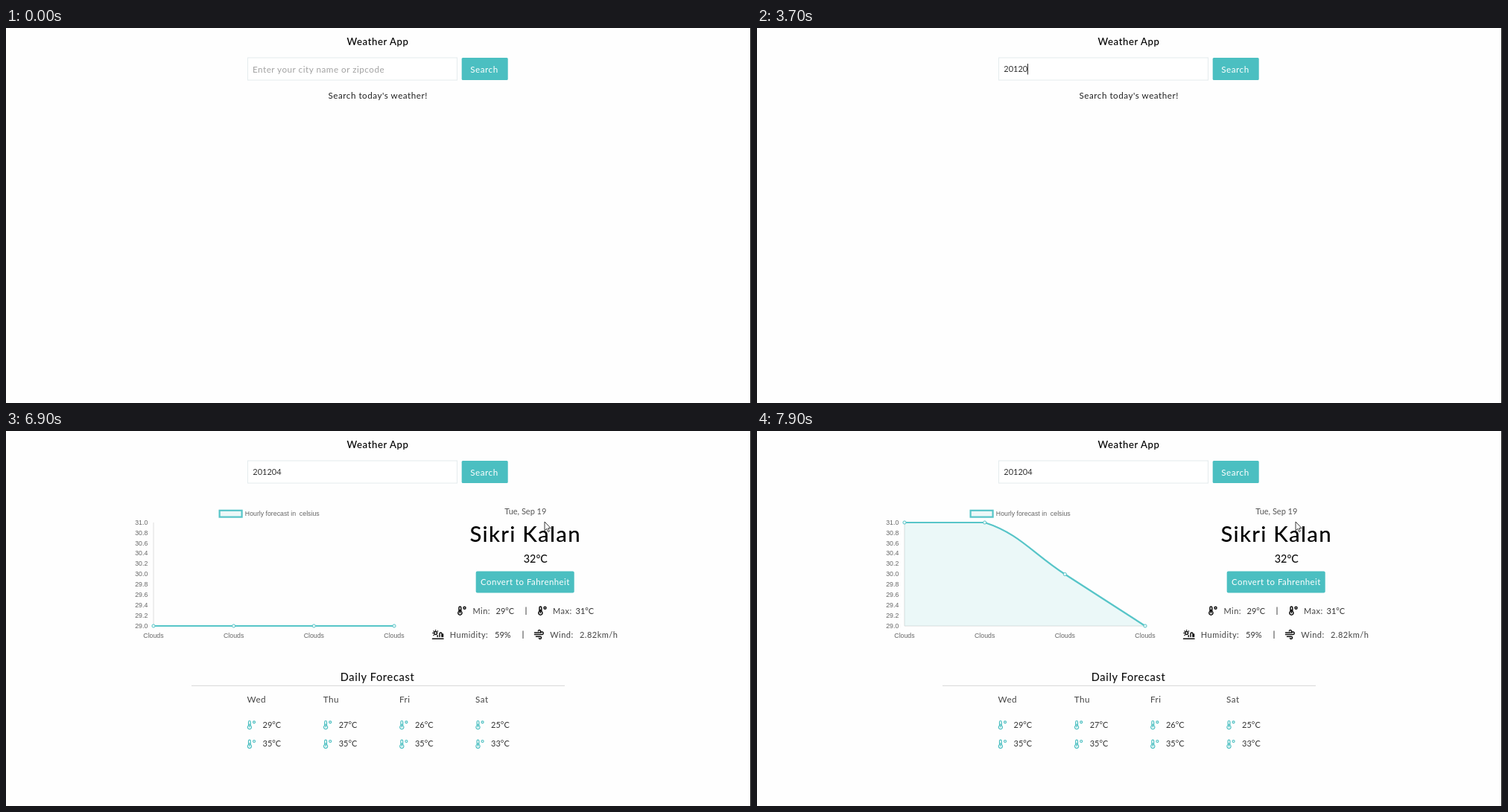
Animation of 1000 by 504 pixels, one loop 8 s. Source, as an HTML page:

```html
<!DOCTYPE html>
<html lang="en">
<head>
<meta charset="utf-8">
<title>Weather App</title>
<style>
  html, body { margin: 0; width: 100%; height: 100%; overflow: hidden; background: #fefefe; }
  svg { display: block; width: 1000px; height: 504px; }
  text { font: 11.7px Lato, "Open Sans", sans-serif; letter-spacing: .043em; fill: #222; }
  .title { font-size: 13.2px; font-weight: 500; fill: #000; }
  .section { font-size: 14.6px; font-weight: 500; fill: #111; }
  .city { font-size: 29.3px; font-weight: 500; fill: #000; }
  .now { font-size: 14.3px; font-weight: 500; letter-spacing: 0; fill: #111; }
  .num { font-size: 11px; letter-spacing: 0; fill: #333; }
  .soft { font-size: 11px; fill: #444; }
  .button { fill: #fff; }
  .hint { fill: #a2a2a2; }
  .chart text { font: 8.78px "Liberation Sans", Arial, sans-serif; letter-spacing: 0; fill: #666; }
  .teal { fill: #4bbfc1; }
  .line { fill: none; stroke: #57c5c8; stroke-width: 2.2; }
  .area { fill: rgba(75, 192, 192, .1); }
  .icon { fill: none; stroke: #111; stroke-width: 1.5; stroke-linecap: round; }
  .icon.cool { stroke: #4bbfc1; stroke-width: 1.2; }
</style>
</head>
<body>
<svg viewBox="0 0 1000 504">
  <defs>
    <g id="thermo">
      <path d="M2 7.4V2.4a1.4 1.4 0 0 1 2.8 0V7.4a2.6 2.6 0 1 1-2.8 0zM3.4 5.5V9.4"/>
      <circle cx="9.5" cy="2.8" r="1.5"/>
    </g>
  </defs>

  <text class="title" x="457.5" y="22.7">Weather App</text>
  <rect x="324.5" y="40" width="281" height="30" fill="#fff" stroke="#e4eced"/>
  <text id="hint" class="hint" x="331" y="59.5">Enter your city name or zipcode</text>
  <text id="zip" class="num" x="331.3" y="59.4"></text>
  <path id="caret" d="M0 48V62.5" stroke="#222"/>
  <rect class="teal" x="611.7" y="40" width="62" height="30" rx="1.5"/>
  <text class="button" x="623.3" y="59.5">Search</text>
  <text id="prompt" x="432.5" y="95.2">Search today's weather!</text>

  <g id="spinner" transform="translate(495 103.7)" stroke="#000" stroke-width="3.4"></g>

  <g id="results">
    <g class="chart">
      <g id="axes"></g>
      <path d="M198 123V262H521" fill="none" stroke="#dedede"/>
      <path id="area" class="area"/>
      <path id="curve" class="line"/>
      <g id="dots" fill="#eef9f9" stroke="#57c5c8"></g>
      <rect class="line" x="286.6" y="106.8" width="30" height="8.8" style="fill:#edf8f8"/>
      <text x="320.8" y="113.8">Hourly forecast in&nbsp; celsius</text>
    </g>

    <text class="num" x="669.3" y="111.5" style="fill:#555">Tue, Sep 19</text>
    <text class="city" x="622.5" y="149.3">Sikri Kalan</text>
    <text class="now" x="694.8" y="176.6">32°C</text>
    <rect class="teal" x="630.7" y="188.5" width="132" height="29" rx="2"/>
    <text class="button" x="637" y="207.4" style="font-size:11.4px">Convert to Fahrenheit</text>

    <use href="#thermo" class="icon" x="606" y="235"/>
    <text class="soft" x="626.5" y="245.5">Min:</text>
    <text class="num" x="657.5" y="245.5">29°C</text>
    <path d="M698 236.5V247M694 268.5V279" stroke="#444"/>
    <use href="#thermo" class="icon" x="714" y="235"/>
    <text class="soft" x="734" y="245.5">Max:</text>
    <text class="num" x="764.5" y="245.5">31°C</text>

    <g class="icon">
      <circle cx="576.6" cy="271.5" r="2"/>
      <path d="M572.8 271.5h.2M576.6 267.8v.1M574 268.9h.1M579.4 268.9h.1M574 274.4h.1M572.5 279.3H587M579.2 276.5v-1.8M582 276.5v-4a1.5 1.5 0 0 1 3 0v4M586.5 273v3.5"/>
      <path d="M709.5 271H716a1.7 1.7 0 1 0-1.6-2.3M709.5 273.6H719.5a1.8 1.8 0 1 0-1.7-2.5M711.5 276.2H717a1.6 1.6 0 1 1-1.5 2.2"/>
    </g>
    <text class="soft" x="595.8" y="277.7">Humidity:</text>
    <text class="num" x="656" y="277.7">59%</text>
    <text class="soft" x="730.3" y="277.7">Wind:</text>
    <text class="soft" x="770" y="277.7">2.82km/h</text>

    <text class="section" x="448.8" y="335.8">Daily Forecast</text>
    <path d="M249 342.3H750" stroke="#d6d6d6"/>
    <g id="days"></g>
  </g>

  <path id="hand" fill="#fff" stroke="#333" stroke-width=".8" stroke-linejoin="round"
    d="M-1.2 .8a1.2 1.2 0 0 1 2.4 0V5.5q1.7-.6 2.2.6 1.6-.5 2 .7 1.7-.2 1.7 1.3V10.5Q7 12.6 5.7 14.3H-.4Q-2 11.4-4 9.2q-.8-1.5.8-1.6l2 1.5z"/>
  <path id="arrow" fill="#fff" stroke="#222" stroke-width=".9" d="M0 0V11.8L2.7 9.3 4.6 13.6 6.4 12.8 4.6 8.7H8.2z"/>
  <path d="M999.5 0V504" stroke="#111"/>
</svg>

<script>
const $ = id => document.getElementById(id);
const repeat = (n, f) => Array.from({ length: n }, (_, i) => f(i)).join('');
const show = (id, on) => $(id).style.display = on ? '' : 'none';
const lastBefore = (steps, t) => steps.filter(s => s[0] <= t).pop();

const LOOP = 8000, STEP = 100;
const LOADING = 6000, LOADED = 6900, CHART_START = 6956;
const typing = [[0, ''], [2300, '20'], [2700, '201'], [3600, '2012'], [3700, '20120'], [4500, '201204']];
const caretSteps = [[0, 0], [1600, 1], [2100, 0], [2300, 1], [3200, 0], [3600, 1], [4200, 0], [4500, 1], [5000, 0]];
const pointer = [[5300, 628, 55], [5400, 639.5, 52], [5500, 642, 53], [5600, 642.5, 54],
                 [6600, 642.5, 54], [6700, 688, 88], [6800, 723, 122]];

const chart = { left: 198, right: 521, top: 123, bottom: 262 };
const temps = [31, 31, 30, 29];
const columnX = i => chart.left + (chart.right - chart.left) * i / 3;

$('axes').innerHTML =
  repeat(11, i => `<text x="190.3" y="${125.7 + 13.9 * i}" text-anchor="end">${(31 - i * .2).toFixed(1)}</text>`) +
  repeat(4, i => `<text x="${columnX(i)}" y="277.5" text-anchor="middle">Clouds</text>`);
$('dots').innerHTML = repeat(4, i => `<circle cx="${columnX(i)}" r="2.1"/>`);
$('spinner').innerHTML = repeat(8, i => `<path d="M0-9.6V-20.2" transform="rotate(${i * 45})"/>`);

const days = [['Wed', 29, 35], ['Thu', 27, 35], ['Fri', 26, 35], ['Sat', 25, 33]];
$('days').innerHTML = repeat(4, i => {
  const [name, ...range] = days[i], x = 323.5 + 102.2 * i;
  return `<text x="${x}" y="365" style="fill:#444">${name}</text>` + repeat(2, j => {
    const y = 398.7 + 25.7 * j;
    return `<use href="#thermo" class="icon cool" x="${x}" y="${y - 10.2}"/>
      <text class="num" x="${x + 21}" y="${y}">${range[j]}°C</text>`;
  });
});

// Cardinal spline with handles kept inside the plot area.
function spline(points, tension = .4) {
  const clamp = y => Math.min(chart.bottom, Math.max(chart.top, y));
  const handles = points.map((p, i) => {
    const a = points[i - 1] || p, b = points[i + 1] || p;
    const before = Math.hypot(p[0] - a[0], p[1] - a[1]);
    const after = Math.hypot(b[0] - p[0], b[1] - p[1]);
    const at = k => [p[0] + k * (b[0] - a[0]), clamp(p[1] + k * (b[1] - a[1]))];
    const k = tension / (before + after);
    return { into: at(-k * before), out: at(k * after) };
  });
  return 'M' + points.map((p, i) =>
    i ? `C${handles[i - 1].out} ${handles[i].into} ${p}` : p).join('');
}

function drawChart(t) {
  const p = Math.min(1, Math.max(0, (t - CHART_START) / 1000));
  const grow = 1 - (1 - p) ** 4;
  const points = temps.map((v, i) =>
    [columnX(i), chart.bottom - (chart.bottom - chart.top) * (v - 29) / 2 * grow]);
  const d = spline(points);
  $('curve').setAttribute('d', d);
  $('area').setAttribute('d', `${d}V${chart.bottom}H${chart.left}z`);
  [...$('dots').children].forEach((dot, i) => dot.setAttribute('cy', points[i][1]));
}

function drawSpinner(t) {
  const dim = (t - LOADING) / 100 % 8;
  [...$('spinner').children].forEach((bar, i) => {
    const gap = Math.abs(i - dim);
    bar.style.opacity = 1 - .35 * Math.max(0, 1 - Math.min(gap, 8 - gap));
  });
}

function draw(t) {
  const zip = lastBefore(typing, t)[1];
  $('zip').textContent = zip;
  show('hint', !zip);
  show('caret', lastBefore(caretSteps, t)[1]);
  $('caret').setAttribute('transform', `translate(${331.5 + zip.length * 6.38})`);

  show('prompt', t < LOADING);
  show('spinner', t >= LOADING && t < LOADED);
  show('results', t >= LOADED);
  drawSpinner(t);
  drawChart(t);

  const at = lastBefore(pointer, t);
  show('hand', at && t < 6700);
  show('arrow', t >= 6700);
  if (at) for (const id of ['hand', 'arrow']) $(id).setAttribute('transform', `translate(${at[1]} ${at[2]})`);
}

function tick() {
  draw(Math.floor(performance.now() % LOOP / STEP) * STEP);
  requestAnimationFrame(tick);
}
tick();
</script>
</body>
</html>
```
